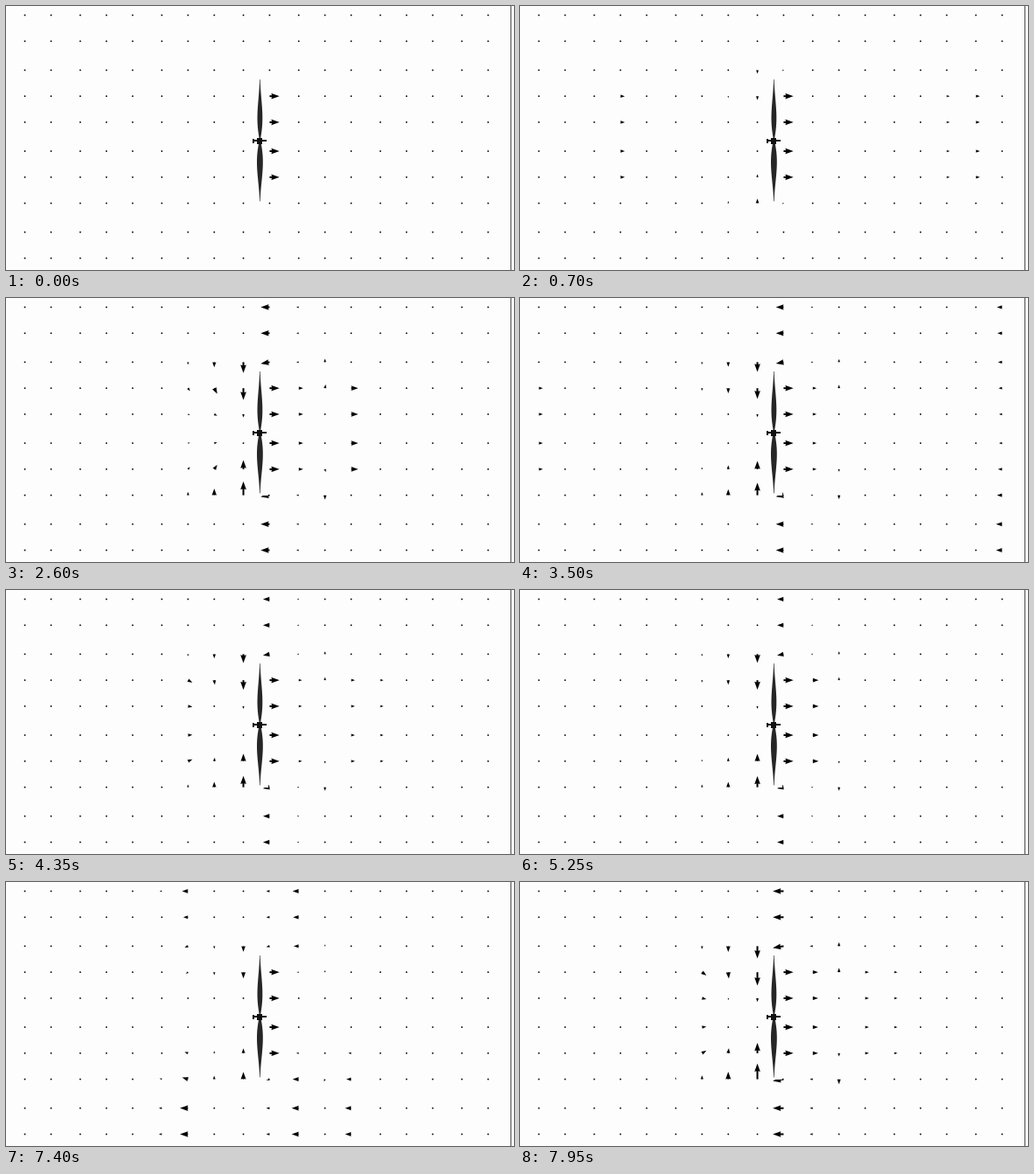
Animation, 579 px wide and 302 px high, one loop 8000 ms. Source, as a matplotlib script:

```python
import numpy as np
import matplotlib.pyplot as plt
from matplotlib.animation import FuncAnimation
from matplotlib.patches import Polygon, Rectangle

W, H, DPI = 579, 302, 100
FRAMES, STEP = 160, 50
RIGHT_WALL = 575
HUB_X, HUB_Y = 289, 154
PAPER, INK = "#fefdfe", "#111111"

# Sample points snap to a mesh of about 3.3 pixels
cols = 21.5 + 528 / 159 * np.round(np.arange(18) * 159 / 17)
rows = 10.5 + 278 / 84 * np.round(np.arange(10) * 84 / 9)
X, Y = np.meshgrid(cols, rows)
DY = Y - HUB_Y

inner = (abs(DY) < 60).astype(float)
outer = 1 - inner
edge = np.clip(abs(DY) / 130 + DY / 400, 0, 1)
low = np.clip(DY / 90, 0, 1)


def bump(x, centre, width):
    return np.exp(-((x - centre) / width) ** 2 / 2)


# Steady shapes: inflow before the disc, jet behind it, backflow around it
at_disc, behind = bump(X, 300, 6), bump(X, 333, 6)
r = abs(DY) / 66
pull = np.sign(DY) * r ** 1.5 * np.exp((1 - r ** 6) / 4)
reach = np.where(X < HUB_X, np.exp((X - 270) / 45), 0)
inflow = pull * (17 * reach - 5.5 * bump(X, 363, 8))
jet = 11.2 * inner * at_disc
swirl_u = 5.5 * inner * behind - outer * (11 * at_disc + 3 * behind)
swirl_v = -2.5 * at_disc * bump(abs(DY), 76, 6)

# Strength of the flow over time, then start and speed of each pulse
TIMES = [0, 1450, 2600, 4350, 6100, 7400, 7950]
LEVEL = [0, .65, .95, .78, .76, .5, 1.08]
PULSES = [(0, .2925), (2200, .2325), (3950, .2725), (5137, .2285), (7520, .2535)]
ENDS = [start for start, _ in PULSES[1:]] + [9000]


def pulse(dist):
    """One pulse runs out both ways and returns reversed from the walls."""
    x = 300 + dist
    if x < RIGHT_WALL:
        u = 8 * inner * bump(X, x, 14)
    else:
        x = 2 * RIGHT_WALL - x
        u = -7 * (.45 + .55 * edge) * bump(X, x, 14)
        if x + 60 < RIGHT_WALL:
            u -= 7 * low * bump(X, x + 60, 14)
    x = 318 - dist
    if x > 0:
        u += 5 * inner * bump(X, x, 14)
    else:
        u -= 11 * edge * bump(X, -x, 14)
    return u * min(dist / 60, 1) * (abs(X - 285) > 20)


def field(t):
    level = np.interp(t, TIMES, LEVEL)
    u = jet + level ** 1.5 * swirl_u
    v = level * (inflow + swirl_v)
    for (start, speed), end in zip(PULSES, ENDS):
        if start < t < end + 100:
            u = u + pulse((t - start) * speed) * min((end + 100 - t) / 150, 1)
    return u, v


fig = plt.figure(figsize=(W / DPI, H / DPI), dpi=DPI, facecolor=PAPER)
ax = fig.add_axes([0, 0, 1, 1])
ax.set_xlim(0, W)
ax.set_ylim(H, 0)
ax.axis("off")

arrows = ax.quiver(X, Y, *field(0), units="dots", width=2, scale=1,
                   scale_units="dots", angles="uv", pivot="tail",
                   headwidth=3.3, headlength=4.6, headaxislength=4.3,
                   color="black", zorder=2)


def box(x, y, w, h, color=INK, z=4):
    ax.add_patch(Rectangle((x, y), w, h, color=color, lw=0, zorder=z))


def blade(tip, root, half):
    s = np.linspace(0, 1, 30)
    y = tip + (root - tip) * s
    w = .3 + half * np.sin(np.pi * s ** 1.5)
    x = HUB_X + .4
    points = np.r_[np.c_[x - w, y], np.c_[x + w, y][::-1]]
    ax.add_patch(Polygon(points, color="#262626", lw=0, zorder=4))


# Propeller seen from the side, on its own pale backing
box(280, 84, 19, 141.7, PAPER, 3)
blade(84, 154, 2.6)
blade(223.5, 152, 3.1)
box(281, 152.7, 16, 2.6)
box(281, 151.5, 2, 5)
box(285.5, 151, 6, 6.5)

box(RIGHT_WALL, 0, 1, H, "#4a4a4a")


def draw(frame):
    arrows.set_UVC(*field(frame * STEP))
    return (arrows,)


anim = FuncAnimation(fig, draw, frames=FRAMES, interval=STEP,
                     repeat=True, repeat_delay=0, blit=False)
plt.show()
```
